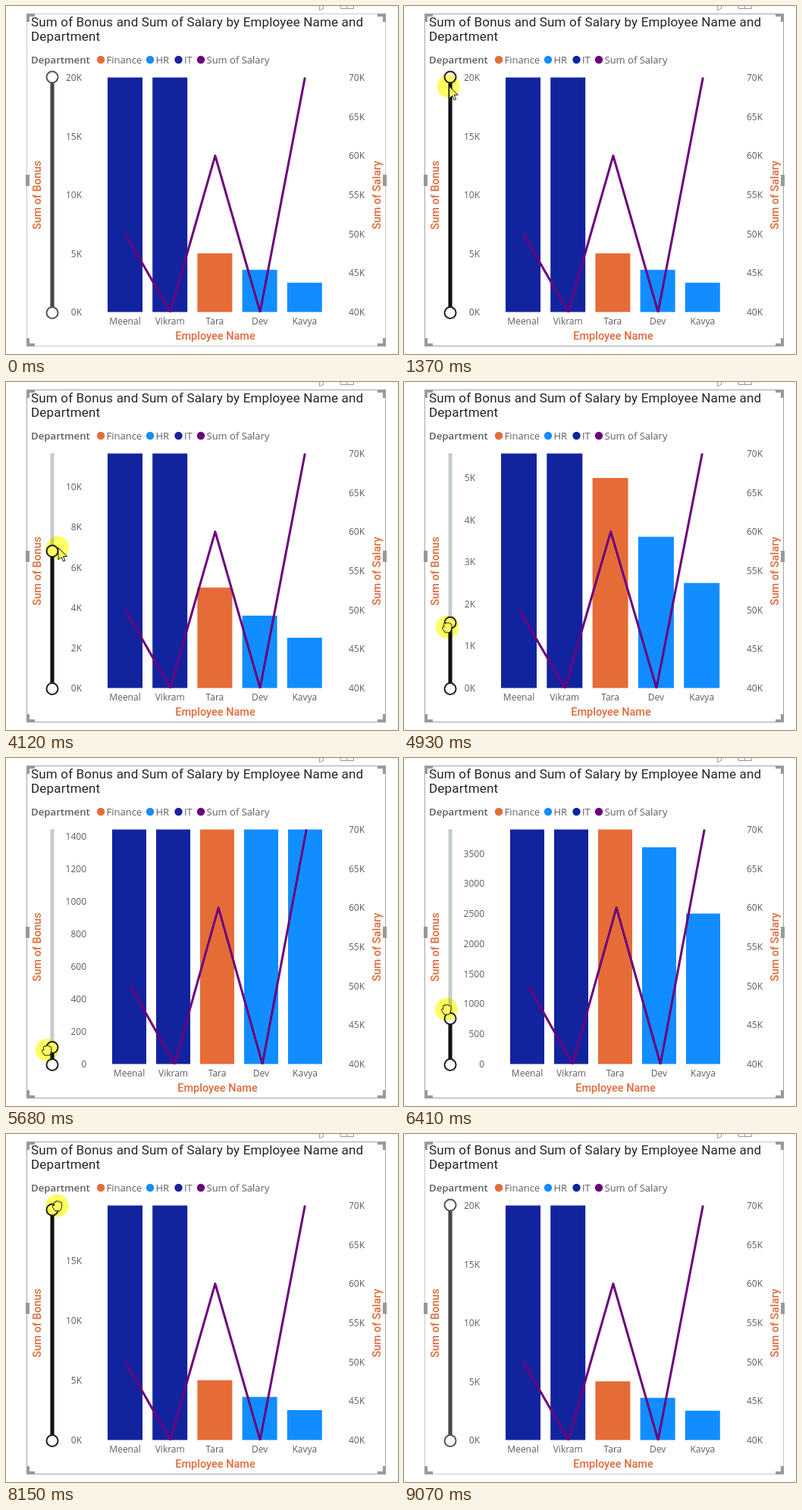
These frames come from a looping animation (517x460 px, 9.62 s). An HTML page:

```html
<!DOCTYPE html>
<html lang="en">
<head>
<meta charset="utf-8">
<title>Bonus and salary chart</title>
<style>
  html, body { margin: 0; width: 517px; height: 460px; overflow: hidden; background: #fff; }
  svg { display: block; }
  text { font-family: "Open Sans", "Noto Sans", sans-serif; font-size: 12px; fill: #605e5c; }
  .title { font-family: Roboto, sans-serif; font-size: 17px; letter-spacing: .17px; fill: #252423; }
  .axis { font-family: Roboto, sans-serif; font-size: 14.5px; font-weight: 500; fill: #de6a3a; text-anchor: middle; }
  .legend { font-size: 13px; }
  .head { font-size: 13.2px; font-weight: 600; }
  .tick { text-anchor: end; }
  .name { text-anchor: middle; }
  #halo { mix-blend-mode: multiply; }
</style>
</head>
<body>
<svg id="stage" width="517" height="460" viewBox="0 0 517 460">
  <rect width="517" height="460" fill="#fff"/>
  <path d="M413.5 0V5.5L418.5 3.5V0M441.5 0V3.5H458.5V0M449.5 0V3.5" fill="none" stroke="#9a94a6"/>
  <rect id="border" x="27.5" y="10.5" width="473" height="439" fill="none"/>
  <g id="handles" fill="#999"></g>
  <text class="title" x="33" y="27">Sum of Bonus and Sum of Salary by Employee Name and</text>
  <text class="title" x="33" y="46">Department</text>
  <text class="head" x="33" y="76">Department</text>
  <g id="legend"></g>
  <text class="axis" transform="translate(46 250) rotate(-90)">Sum of Bonus</text>
  <text class="axis" transform="translate(494 250) rotate(-90)">Sum of Salary</text>
  <text class="axis" id="category" y="441">Employee Name</text>
  <clipPath id="plot"><rect x="110" y="94" width="330" height="311"/></clipPath>
  <g id="chart"></g>
  <g id="slider">
    <line id="rail" x1="61" x2="61" y1="94" y2="405" stroke="#c6cccd" stroke-width="5"/>
    <line id="range" x1="61" x2="61" y2="405" stroke-width="5"/>
    <circle id="knob" cx="61" r="7.5" fill="#fff" stroke-width="2"/>
    <circle id="base" cx="61" cy="405.5" r="7.5" fill="#fff" stroke-width="2"/>
  </g>
  <g id="cursor">
    <path id="arrow" d="M1 0V16L5 12.5L7.5 18L10 17L7.5 11.5H12.5Z" fill="#fff" stroke="#111"/>
    <path id="hand" d="M-3 7L-6.5 1.5Q-7 -1 -4 0L-4.500 -4Q-3.500 -7 -2 -4Q-1.500 -8.500 .5 -5Q2 -8 3.500 -4Q6 -6 6 -2L5.500 3L3.500 7Z" fill="#fff" stroke="#222"/>
    <path id="pointer" d="M-3 8L-7 1.500Q-6.500 -1 -4 1V-7Q-2.500 -10 -1 -7V-2Q1 -4 2 -1.500Q4 -3 5 -.5Q7.500 -1.500 7 2L5 8Z" fill="#fff" stroke="#222"/>
  </g>
  <circle id="halo" r="15" fill="#ffff62"/>
</svg>
<script>
const LOOP = 9620, FRAME = 1000 / 15;
const TOP = 94.5, BOTTOM = 404.5, HEIGHT = BOTTOM - TOP;
const BLUE = '#12239e', SKY = '#118dff', ORANGE = '#e66c37', PURPLE = '#6b007b';

const people = [
  { name: 'Meenal', bonus: 20, salary: 50, color: BLUE },
  { name: 'Vikram', bonus: 20, salary: 40, color: BLUE },
  { name: 'Tara', bonus: 5, salary: 60, color: ORANGE },
  { name: 'Dev', bonus: 3.6, salary: 40, color: SKY },
  { name: 'Kavya', bonus: 2.5, salary: 70, color: SKY }
];

// Plot geometry for each width of the left-hand labels
const layouts = {
  wide: { left: 134, pitch: 59.2, bar: 46, labels: 100, title: 276, shift: .5 },
  short: { left: 128, pitch: 60.3, bar: 47, labels: 94, title: 273, shift: .6 },
  plain: { left: 140, pitch: 58, bar: 45, labels: 106, title: 279, shift: 1.7 }
};

// time, upper limit of the bonus axis in thousands
const limitKeys = [
  [1900, 20], [2800, 18.6], [4133, 11.67], [4933, 5.585], [5300, 3], [5700, 1.3],
  [5900, 1.3], [6400, 3.896], [6900, 8], [7400, 12.88], [7800, 17.6], [8200, 20]
];
// time, x, y
const cursorKeys = [
  [67, 130, 482], [200, 120, 445], [530, 92, 400], [740, 92, 400], [960, 14, 250],
  [1370, 63, 92], [1900, 63, 92], [2800, 67, 120], [4133, 68, 219], [4933, 57, 324],
  [5300, 53, 365], [5700, 54, 388], [5900, 54, 388], [6400, 56, 332], [6900, 54, 262],
  [7400, 60, 179], [7800, 66, 118], [8200, 68, 90], [8500, 68, 73], [8860, 68, 73],
  [9000, 248, 365], [9060, 300, 482]
];

const $ = id => document.getElementById(id);

function set(node, attrs) {
  for (const key in attrs) node.setAttribute(key, attrs[key]);
  return node;
}

function add(parent, tag, attrs, text = '') {
  const node = set(document.createElementNS('http://www.w3.org/2000/svg', tag), attrs);
  node.textContent = text;
  return parent.appendChild(node);
}

function sample(keys, t) {
  if (t <= keys[0][0]) return keys[0].slice(1);
  const i = keys.findIndex(key => key[0] > t);
  if (i < 0) return keys[keys.length - 1].slice(1);
  const a = keys[i - 1], b = keys[i], p = (t - a[0]) / (b[0] - a[0]);
  return a.slice(1).map((v, k) => v + (b[k + 1] - v) * p);
}

for (const [sx, x] of [[1, 27], [-1, 501]]) {
  for (const [sy, y] of [[1, 10], [-1, 450]]) {
    add($('handles'), 'path', { d: 'M0 0H11V4H4V11H0Z', transform: `translate(${x} ${y}) scale(${sx} ${sy})` });
  }
  add($('handles'), 'rect', { x: sx > 0 ? 26 : 497, y: 223, width: 5, height: 15 });
}

[['Finance', 125, ORANGE], ['HR', 190, SKY], ['IT', 227.5, BLUE], ['Sum of Salary', 257, PURPLE]]
  .forEach(([label, x, fill]) => {
    add($('legend'), 'circle', { cx: x, cy: 71, r: 5.2, fill });
    add($('legend'), 'text', { class: 'legend', x: x + 7.5, y: 76 }, label);
  });

const chart = $('chart');
for (const p of people) {
  p.rect = add(chart, 'rect', { fill: p.color });
  p.label = add(chart, 'text', { class: 'name', y: 421 }, p.name);
}
const line = add(chart, 'polyline', {
  fill: 'none', stroke: PURPLE, 'stroke-width': 3, 'stroke-linejoin': 'round', 'clip-path': 'url(#plot)'
});
for (let k = 40; k <= 70; k += 5) {
  add(chart, 'text', { x: 452, y: BOTTOM - (k - 40) / 30 * HEIGHT + 4.5 }, k + 'K');
}
const ticks = Array.from({ length: 9 }, () => add(chart, 'text', { class: 'tick' }));

function drawChart(limit) {
  const step = [.1, .2, .5, 1, 2, 5].find(s => limit / s <= 8);
  const box = step < 1 ? layouts.plain : limit < 10 ? layouts.short : layouts.wide;

  ticks.forEach((tick, i) => {
    const value = i * step;
    tick.textContent = value > limit + .001 ? '' : step < 1 ? Math.round(value * 1000) : value + 'K';
    set(tick, { x: box.labels, y: BOTTOM - value / limit * HEIGHT + 4.5 });
  });

  const points = people.map((p, i) => {
    const x = box.left + i * box.pitch, mid = x + box.bar / 2;
    const height = Math.min(1, p.bonus / limit) * HEIGHT;
    set(p.rect, { x, y: BOTTOM - height, width: box.bar, height });
    set(p.label, { x: mid });
    return [mid + box.shift, BOTTOM - (p.salary - 40) / 30 * HEIGHT];
  });
  set(line, { points: points.join(' ') });
  set($('category'), { x: box.title });
}

function drawSlider(limit, active) {
  const y = 405 - limit / 20 * 311, ink = active ? '#111' : '#4a4545';
  set($('range'), { y1: y, stroke: ink });
  set($('knob'), { cy: y, stroke: active ? '#222' : '#5a5555' });
  set($('base'), { stroke: active ? '#222' : '#5a5555' });
}

function drawCursor(t, x, y) {
  const dragging = t >= 1900 && t < 8600 && !(t > 3950 && t < 4350);
  const shape = !dragging ? 'arrow' : t < 3950 ? 'pointer' : 'hand';
  for (const id of ['arrow', 'hand', 'pointer']) {
    $(id).style.display = id === shape ? '' : 'none';
  }
  set($('cursor'), { transform: `translate(${x} ${y})` });
  set($('halo'), { cx: x, cy: y });
}

function render(t) {
  const [limit] = sample(limitKeys, t);
  const [x, y] = sample(cursorKeys, t);
  const inside = x > 27 && x < 501 && y > 10 && y < 450;
  set($('border'), { stroke: inside ? '#a3a3a3' : '#c8c8c8' });
  drawChart(limit);
  drawSlider(limit, Math.abs(x - 61) < 12 && y > 60 && y < 415);
  drawCursor(t, x, y);
}

const start = performance.now();
function tick() {
  const t = Math.max(0, performance.now() - start) % LOOP;
  render(Math.floor((t + 15) / FRAME) * FRAME);
  requestAnimationFrame(tick);
}
tick();
</script>
</body>
</html>
```
